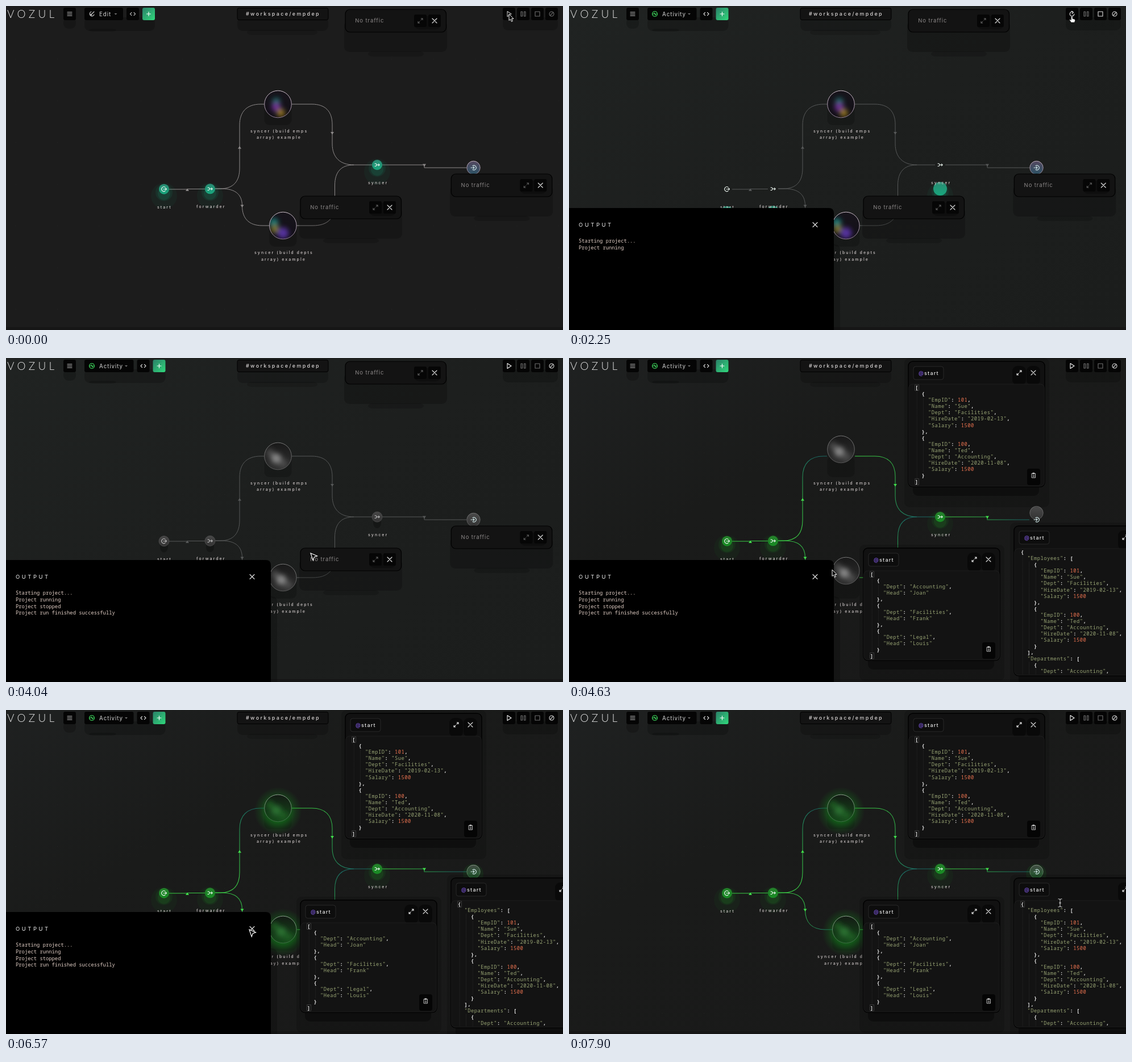
Write an HTML page that moves like this. It is 980 px wide and 571 px high and loops after 8 s.

```html
<!DOCTYPE html>
<html lang="en">
<head>
<meta charset="utf-8">
<title>Flow editor</title>
<style>
html, body { margin: 0; width: 100%; height: 100%; overflow: hidden; background: #1c1c1c; }
svg { display: block; width: 980px; height: 571px; }
text { font-family: Inter, "Open Sans", sans-serif; }
.label { font-size: 7px; font-weight: 500; letter-spacing: 2.07px; fill: #cfc8c8; }
.mode { font-size: 9.8px; letter-spacing: .9px; fill: #d5d5d5; }
.title { font-size: 9px; font-weight: 500; letter-spacing: 2.3px; fill: #d8d4d4; }
.quiet { font-size: 9.5px; letter-spacing: .9px; fill: #8c8888; }
.tag { font-size: 9px; font-weight: 500; letter-spacing: 1.2px; fill: #e8e8e8; }
.head { font-size: 9.5px; letter-spacing: 3.5px; fill: #eee; }
.brand { font-family: Lato, sans-serif; font-weight: 300; font-size: 19px; letter-spacing: 5.4px; fill: #e4e4e4; }
.log, .code { font-family: "Noto Sans Mono", "DejaVu Sans Mono", monospace; }
.log { font-size: 8.83px; fill: #e2cfc6; }
.code { font-size: 8.8px; font-weight: 600; letter-spacing: .48px; fill: #e6e6e6; }
.str { font-weight: 400; fill: #98a474; }
.num { font-weight: 400; fill: #ea7350; }
</style>
</head>
<body>
<svg viewBox="0 0 980 571">
  <defs id="defs"></defs>
  <g id="scene"></g>
</svg>
<script>
const LOOP = 8000;

// Each step changes part of the state and holds until the next one.
const steps = [
  [0, { mode: 'edit', cursor: ['pointer', 885, 14], log: 0, small: 0, big: 0 }],
  [150, { cursor: ['pointer', 884, 15] }],
  [300, { cursor: ['hand', 885, 16], hover: true }],
  [450, { cursor: ['hand', 885, 17] }],
  [600, { cursor: ['hand', 885, 18] }],
  [2250, { mode: 'drop', running: true, output: true, log: 2, small: 42 }],
  [2400, { mode: 'idle', small: 0 }],
  [2850, { cursor: ['arrow', 848, 72], hover: false }],
  [3000, { cursor: ['arrow', 772, 173] }],
  [3300, { running: false, log: 4 }],
  [3600, { cursor: ['arrow', 718, 248] }],
  [3900, { cursor: ['arrow', 622, 303] }],
  [4040, { cursor: ['arrow', 536, 344] }],
  [4190, { cursor: ['arrow', 508, 356] }],
  [4340, { mode: 'live', small: -12, cursor: ['pointer', 484, 365] }],
  [4480, { small: -5, big: -6, cursor: ['pointer', 468, 371] }],
  [4630, { small: 0, big: -12, cursor: ['pointer', 463, 373] }],
  [4780, { big: -4, lit: true, cursor: ['arrow', 485, 430] }],
  [4930, { big: 0, cursor: ['arrow', 505, 479] }],
  [5080, { cursor: ['arrow', 500, 472] }],
  [5230, { cursor: ['arrow', 483, 450] }],
  [5370, { cursor: ['arrow', 462, 424] }],
  [5520, { cursor: ['arrow', 442, 402] }],
  [5670, { cursor: ['arrow', 431, 391] }],
  [5820, { cursor: ['arrow', 428, 387] }],
  [6720, { output: false }],
  [7470, { cursor: ['arrow', 530, 450] }],
  [7620, { cursor: ['text', 696, 470] }],
  [7760, { cursor: ['text', 812, 395] }],
  [7900, { cursor: ['text', 864, 340] }]
];

const staff = [
  { EmpID: 101, Name: 'Sue', Dept: 'Facilities', HireDate: '2019-02-13', Salary: 1500 },
  { EmpID: 100, Name: 'Ted', Dept: 'Accounting', HireDate: '2020-11-08', Salary: 1500 }
];
const depts = [['Accounting', 'Joan'], ['Facilities', 'Frank'], ['Legal', 'Louis']]
  .map(([Dept, Head]) => ({ Dept, Head }));
const logLines = ['Starting project...', 'Project running', 'Project stopped', 'Project run finished successfully'];

const rect = (x, y, w, h, fill, rx = 3, extra = '') =>
  `<rect x="${x}" y="${y}" width="${w}" height="${h}" rx="${rx}" fill="${fill}" ${extra}/>`;
const circle = (x, y, r, fill, extra = '') => `<circle cx="${x}" cy="${y}" r="${r}" fill="${fill}" ${extra}/>`;
const text = (cls, x, y, s) => `<text class="${cls}" x="${x}" y="${y}">${s}</text>`;
const line = (d, stroke, w = 1) => `<path d="${d}" fill="none" stroke="${stroke}" stroke-width="${w}"/>`;
const at = (x, y, body) => `<g transform="translate(${x} ${y})">${body}</g>`;
const icon = (name, x, y, color, w = 1.1) => at(x, y,
  `<path d="${icons[name]}" fill="none" stroke="${color}" stroke-width="${w}" stroke-linecap="round" stroke-linejoin="round"/>`);
const shade = (x, y, w, h, o = .2) => rect(x, y, w, h, '#000', 9, `opacity="${o}"`);

const icons = {
  menu: 'M-4-3H4M-4 0H4M-4 3H4',
  pen: 'M-1-4A4 4 0 1 0 4 1M-1 1L4-4M-2 0V2H0',
  wave: 'M-4.5 0A4.5 4.5 0 1 1 4.5 0A4.5 4.5 0 1 1-4.5 0M-4 0H-2L-.5-2L1 2L2 0H4',
  code: 'M-2-2.6L-4.5 0L-2 2.6M2-2.6L4.5 0L2 2.6',
  plus: 'M-3.5 0H3.5M0-3.5V3.5',
  play: 'M-3-4.5L4 0L-3 4.5Z',
  again: 'M2.5-2.8A3.8 3.8 0 1 0 3.8 0M-.5-5L2.5-2.8L0-.5',
  pause: 'M-4-4H-1.5V4H-4ZM1.5-4H4V4H1.5Z',
  stop: 'M-4-4H4V4H-4Z',
  block: 'M-4 0A4 4 0 1 1 4 0A4 4 0 1 1-4 0M-2.7 2.7L2.7-2.7',
  close: 'M-4-4L4 4M4-4L-4 4',
  grow: 'M1-1L4-4M1.3-4H4V-1.3M-1 1L-4 4M-1.3 4H-4V1.3',
  clip: 'M-3-3.5H3V4H-3ZM-1.2-4.5H1.2V-2.7H-1.2ZM-1.2 0H1.2M-1.2 2H1.2',
  merge: 'M-4-2.3H-3C-1-2.3-1.5 0 .5 0H4M-4 2.3H-3C-1 2.3-1.5 0 .5 0M2.4-1.7L4.2 0L2.4 1.7',
  out: 'M2-3.3A4 4 0 1 0 2 3.3M-1 0H4.5M2.8-1.7L4.5 0L2.8 1.7',
  into: 'M-2-3.3A4 4 0 1 1-2 3.3M-5 0H1M-.7-1.7L1 0L-.7 1.7'
};

const wires = [
  ['w0', 'M287 323H319V322.5H350', [287, 323, 900, 323]],
  ['w1', 'M368 322H377C401 322 411 308 411 286V210C411 186 424 173 448 173H454', [411, 322, 430, 173]],
  ['w2', 'M503 173H538C562 173 574 186 574 209V243C574 267 588 280 612 280H644', [503, 173, 615, 280]],
  ['w3', 'M368 322H380C403 322 415.5 332 415.5 352C415.5 375 428 387 451 387H463', [368, 322, 463, 387]],
  ['w4', 'M511 387H540C565 387 578.5 375 578.5 350V316C578.5 292 590 280 612 280', [511, 387, 590, 285]],
  ['w5', 'M662 280H736V285H810', [662, 280, 790, 280]]
];
const heads = [[319, 324, -1], [411, 249.5, -1], [574, 224, 1], [415.5, 352.5, 1], [736, 280.5, 1]];

const stops = list => list.map(([o, c]) => `<stop offset="${o}" stop-color="${c}"/>`).join('');
const linear = (id, [x1, y1, x2, y2], list, user) =>
  `<linearGradient id="${id}" x1="${x1}" y1="${y1}" x2="${x2}" y2="${y2}"${user ? ' gradientUnits="userSpaceOnUse"' : ''}>${stops(list)}</linearGradient>`;
const fade = (id, a, b) => linear(id, [0, 0, 0, 1], [[0, a], [1, b]]);

document.getElementById('defs').innerHTML =
  wires.map(([id, , box]) => linear(id, box, [[0, '#3cd146'], [.5, '#30ad47'], [1, '#1b6962']], true)).join('') +
  linear('add', [0, 0, 1, 1], [[0, '#2b7f68'], [1, '#30d97c']]) +
  linear('haze', [0, 0, 1, 1], [[0, '#202322'], [.45, '#1d1f1e'], [1, '#1b1d1c']]) +
  linear('dim', [0, 0, 1, 1], [[0, '#1f2121'], [.35, '#1a1b1a'], [1, '#191919']]) +
  fade('rimEdit', '#cdbfca', '#8d7a91') + fade('rimIdle', '#777', '#555') + fade('rimLive', '#8b9d8b', '#3a6d40') +
  fade('ballEdit', '#17141b', '#120f17') + fade('ballIdle', '#191919', '#303030') + fade('ballLive', '#131b14', '#164a1b') +
  fade('endEdit', '#54485f', '#2d5366') + fade('endIdle', '#4a4a4a', '#333') + fade('endLive', '#414b43', '#1f5a2b') +
  fade('dotEdit', '#2a8a72', '#18a67d') + fade('dotIdle', '#474747', '#333') + fade('dotLive', '#25802b', '#188c24') +
  '<radialGradient id="halo"><stop offset=".45" stop-color="#128a1c" stop-opacity=".6"/>' +
  '<stop offset=".75" stop-color="#128a1c" stop-opacity=".2"/><stop offset="1" stop-color="#128a1c" stop-opacity="0"/></radialGradient>' +
  '<filter id="soft" x="-1" y="-1" width="3" height="3"><feGaussianBlur stdDeviation="4"/></filter>' +
  '<clipPath id="ball"><circle r="24"/></clipPath><clipPath id="stage"><rect width="980" height="571"/></clipPath>';

function backdrop(s) {
  const fill = s.mode === 'edit' ? '#1c1c1c' : s.mode === 'live' ? 'url(#dim)' : 'url(#haze)';
  let out = rect(0, 0, 980, 571, fill, 0);
  for (let x = 17; x < 980; x += 73.5)
    for (let y = 93.5; y < 571; y += 73.5) out += circle(x, y, .6, '#272727');
  return out + rect(0, 566, 980, 5, '#161616', 0);
}

function topBar(s) {
  const edit = s.mode === 'edit', grow = edit ? 0 : 18.5;
  const button = (x, name, color, fill = '#050505') => rect(x, 3, 22, 22, fill) + icon(name, x + 11, 14, color);
  const off = '#707070', on = '#e2e2e2';
  return shade(101, 20, 22, 20) + shade(138, 20, 124 + grow, 24) + shade(146, 40, 48, 5) +
    shade(407, 20, 160, 24) + shade(424, 42, 124, 9, .15) + shade(874, 20, 97, 23) +
    text('brand', 2, 20.5, 'VOZUL') + button(101, 'menu', '#c9c9c9') +
    rect(138, 3, 68 + grow, 22, '#050505') +
    icon(edit ? 'pen' : 'wave', 151, 14, edit ? '#ccc' : '#3ed65c') +
    text('mode', 164, 17.5, edit ? 'Edit' : 'Activity') +
    `<path d="M${190.5 + grow} 13h5l-2.5 2.5z" fill="#777"/>` +
    button(212 + grow, 'code', edit ? '#c0c0c0' : '#eee') + button(240 + grow, 'plus', '#fff', 'url(#add)') +
    rect(407, 3.5, 160, 21, '#131313', 3, 'stroke="#000"') + text('title', 422, 17, '#workspace/empdep') +
    button(874, s.running ? 'again' : 'play', edit && !s.hover ? '#bbb' : '#f0f0f0') +
    button(899, 'pause', off) + button(924, 'stop', s.running ? on : off) + button(949, 'block', edit ? off : on);
}

function wiring(s) {
  const live = s.mode === 'live', flat = s.mode === 'edit' ? '#8f8b8b' : '#575959';
  return wires.map(([id, d]) => line(d, live ? `url(#${id})` : flat, live ? 1.1 : 1)).join('') +
    heads.map(([x, y, k]) => `<path d="M${x - 3} ${y - 2 * k}h6l-3 ${4.5 * k}z" fill="${live ? '#42e04c' : flat}"/>`).join('');
}

function dot(s, x, y, name) {
  const live = s.mode === 'live', idle = s.mode === 'idle', drop = s.mode === 'drop';
  const kind = idle ? 'Idle' : live ? 'Live' : 'Edit', glow = live ? '#1f9a2a' : '#17a27c';
  const cy = y + s.small;
  const ring = (dy, r, o) => circle(x, cy + dy, r, glow, `opacity="${o}"`);
  let out = idle ? shade(x - 7, y, 14, 20, .25) : ring(12, 23, .06) + ring(6, 15, .1) + ring(8, 11, .15);
  out += circle(x, cy, drop ? 12 : 9, `url(#dot${kind})`, idle ? 'stroke="#555" stroke-width=".7"' : '');
  return out + icon(name, x, y, idle ? '#bbb' : '#eef7f2');
}

const tints = {
  a: [[-3, -4, 7, '#1c6d6d'], [-3, 5, 8, '#6d2f93'], [5, 15, 7, '#94761f']],
  b: [[-16, -5, 8, '#1b7a74'], [-14, 6, 7, '#7d7524'], [0, 13, 10, '#55309c']]
};
const shine = (core, edge) => [[-3, 4, 9, core], [9, 13, 8, edge], [-14, -6, 7, edge]];

const glass = s => s.mode === 'edit' || s.mode === 'drop' ? 'Edit' : s.lit ? 'Live' : 'Idle';

function sphere(s, x, y, key) {
  const kind = glass(s);
  const blobs = { Edit: tints[key], Idle: shine('#858585', '#484848'), Live: shine('#2c7030', '#1b5a20') }[kind];
  let out = shade(x - 24, y, 48, 37);
  if (s.lit) out += circle(x, y + 5, 42, 'url(#halo)');
  return out + at(x, y + s.big, circle(0, 0, 24, `url(#ball${kind})`) +
    '<g clip-path="url(#ball)"><g filter="url(#soft)">' + blobs.map(b => circle(...b)).join('') + '</g></g>' +
    circle(0, 0, 23.8, 'none', `stroke="url(#rim${kind})"`));
}

function endNode(s) {
  const kind = glass(s);
  return (s.lit ? circle(822, 289, 18, '#168a22', 'opacity=".12"') : '') +
    circle(822.5, 285 + s.big, 11.7, `url(#end${kind})`, `stroke="url(#rim${kind})" stroke-width=".9"`) +
    icon('into', 823, 285, '#cfe6e6');
}

const labels = () =>
  text('label', 430, 223, 'syncer (build emps') + text('label', 441, 234, 'array) example') +
  text('label', 437, 437, 'syncer (build depts') + text('label', 449, 448.5, 'array) example') +
  text('label', 266, 356.5, 'start') + text('label', 335, 356, 'forwarder') + text('label', 637, 313.5, 'syncer');

function codeBlock(data, max, boxed) {
  const pitch = 5.76, row = 11.05;
  const lines = JSON.stringify(data, null, 2).split('\n').slice(0, max);
  let out = '';
  lines.forEach((raw, i) => {
    const body = raw.trim(), pad = raw.length - body.length, y = 46 + i * row;
    for (let k = 0; k < pad; k += 2) out += rect(14.8 + k * pitch, y - 5.5, .6, row, '#272727', 0);
    const edge = i === 0 ? boxed : i === lines.length - 1 && pad === 0;
    if (edge) out += rect(11.8, y - 5, 6.5, 10.5, 'none', 0, 'stroke="#555" stroke-width=".6"');
    const marked = body.replace(/"[^"]*"|\d+/g, m => `<tspan class="${m[0] === '"' ? 'str' : 'num'}">${m}</tspan>`);
    out += text('code', 12 + pad * pitch, y + 3.2, marked);
  });
  return out;
}

function closedPanel(x, y) {
  return at(x, y, shade(-2, 20, 181, 55, .22) + shade(40, 74, 98, 9, .18) +
    rect(0, 0, 177.5, 40, '#131313', 8, 'stroke="#000" stroke-width="1.2"') +
    text('quiet', 17.3, 23.2, 'No traffic') +
    shade(121, 12, 47, 23, .25) + rect(121, 9, 22, 22, '#060606') + rect(146, 9, 22, 22, '#060606') +
    icon('grow', 132, 20, '#777', .9) + icon('close', 157, 20, '#e6e6e6'));
}

function openPanel(x, y, h, data, max, boxed) {
  return at(x, y, shade(-7, -6, 255, h + 42, .16) + shade(8, h - 8, 222, 24, .35) +
    rect(0, 0, 240, h, '#111', 8, 'stroke="#000" stroke-width="1.4"') +
    shade(183, 8, 24, 34, .45) + shade(208, 8, 24, 34, .45) +
    rect(.7, 40, 238.6, h - 41, '#131313', 7, 'stroke="#242424" stroke-width=".7"') +
    rect(9, 9, 53, 23, '#0d0d0d', 4, 'stroke="#292929"') +
    text('tag', 18, 23.5, '<tspan fill="#8259e8">@</tspan>start') +
    icon('grow', 195, 20, '#e2e2e2') + icon('close', 220, 20, '#e2e2e2') +
    codeBlock(data, max, boxed) +
    rect(209, h - 32, 23, 29, '#050505', 4) + icon('clip', 220.5, h - 20, '#d0d0d0', .9));
}

function panels(s) {
  if (s.mode !== 'live') return closedPanel(597, 6) + closedPanel(518, 335) + closedPanel(783.3, 296);
  return openPanel(597, 6, 221, staff, 99, true) + openPanel(518, 335, 198, depts, 99, true) +
    openPanel(783, 296, 264, { Employees: staff, Departments: depts }, 20, s.lit);
}

function outputPanel(s) {
  if (!s.output) return '';
  return shade(440, 420, 37, 160, .2) + '<path d="M0 356H457Q466 356 466 365V571H0Z" fill="#000"/>' +
    text('head', 17, 389.3, 'OUTPUT') + icon('close', 433, 385.5, '#e4e4e4') +
    logLines.slice(0, s.log).map((l, i) => text('log', 17, 417 + i * 11.8, l)).join('');
}

const cursors = {
  pointer: '<path d="M0 0V11.5L2.6 9.2L4.4 13.4L6.4 12.5L4.6 8.5H8Z" fill="#000" stroke="#fff"/>',
  arrow: '<path d="M0 0L11.5 5L6.3 6.8L4.2 12.5Z" fill="#000" stroke="#fff" stroke-width="1.2"/>',
  hand: '<path d="M-1.5 1Q0-1 1 1V4.5L4 5Q5.5 5.5 5.5 7.5L4.5 11H-1.5L-4.5 6.5Q-4 5-1.5 6.5Z" fill="#fff" stroke="#000" stroke-width=".6"/>',
  text: '<path d="M-3.5-7H-1L0-6L1-7H3.5M0-6V6M-3.5 7H-1L0 6L1 7H3.5M-2 0H2" fill="none" stroke="#000" stroke-width="2.6"/>' +
    '<path d="M-3.5-7H-1L0-6L1-7H3.5M0-6V6M-3.5 7H-1L0 6L1 7H3.5M-2 0H2" fill="none" stroke="#eee"/>'
};

function draw(s) {
  const [kind, x, y] = s.cursor;
  return '<g clip-path="url(#stage)">' + backdrop(s) + topBar(s) + wiring(s) +
    dot(s, 278, 322.7, 'out') + dot(s, 359, 322.3, 'merge') + dot(s, 653, 280, 'merge') +
    sphere(s, 478.5, 173, 'a') + sphere(s, 487.3, 387, 'b') + endNode(s) +
    labels() + panels(s) + outputPanel(s) + at(x, y, cursors[kind]) + '</g>';
}

let held = {};
const states = steps.map(([time, change]) => [time, held = { ...held, ...change }]);
const scene = document.getElementById('scene');
const begin = performance.now();
let shown = -1;

function tick() {
  const t = (performance.now() - begin) % LOOP;
  const i = states.filter(([time]) => time <= t).length - 1;
  if (i !== shown) scene.innerHTML = draw(states[shown = i][1]);
  requestAnimationFrame(tick);
}
tick();
</script>
</body>
</html>
```
